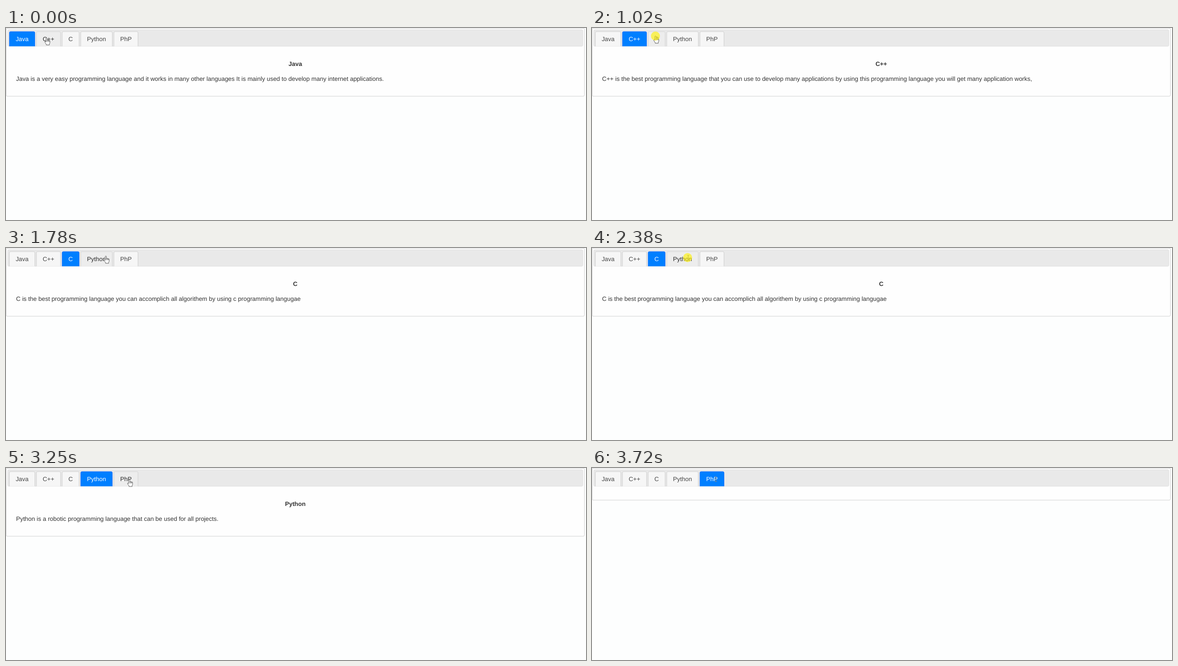
Write an HTML page that moves like this. It is 1280 px wide and 425 px high and loops after 4.07 s.

```html
<!DOCTYPE html>
<html lang="en">
<head>
<meta charset="utf-8">
<title>Language tabs</title>
<style>
html, body { margin: 0; width: 100%; height: 100%; overflow: hidden; background: #fdfefe; }
svg { display: block; font: 15.97px "Liberation Sans", Arial, sans-serif; text-rendering: geometricPrecision; }
.panel { fill: #fefefe; stroke: #c5c5c5; }
.nav { fill: #e9e9e9; stroke: #ddd; }
.tab path { fill: #f6f6f6; stroke: #c5c5c5; }
.tab text { fill: #454545; text-anchor: middle; }
.hover path { fill: #ededed; stroke: #ccc; }
.hover text { fill: #2b2b2b; }
.active path { fill: #007fff; stroke: #0062ff; }
.active text { fill: #fff; }
.body { fill: #333; }
.title { font-weight: bold; text-anchor: middle; }
.ring { fill: #fff200; opacity: .62; }
.beam { fill: none; stroke: #fff; mix-blend-mode: difference; opacity: .6; }
.hand { fill: #fff; stroke: #3a3a3a; stroke-width: .85; }
</style>
</head>
<body>
<svg id="stage" width="1280" height="425"></svg>
<script>
const LOOP = 4070, STEP = 65, SCALE = 0.8412;

const pages = {
  "Java": "Java is a very easy programming language and it works in many other languages It is mainly used to develop many internet applications.",
  "C++": "C++ is the best programming language that you can use to develop many applications by using this programming language you will get many application works,",
  "C": "C is the best programming language you can accomplich all algorithem by using c programming langugae",
  "Python": "Python is a robotic programming language that can be used for all projects.",
  "PhP": ""
};

// Each glide: start time, end time, pointer x, pointer y at the end.
const home = [89.5, 21.5];
const glides = [
  [550, 820, 140, 17.7], [1490, 1630, 222, 17.2], [1780, 1980, 211, 21.3],
  [2520, 2720, 291, 21], [3120, 3190, 257, 24], [3250, 3250, 272, 25]
];

// Each click: button down, text cursor appears, tab opens.
const clicks = [[70, 270, 270], [1020, 1290, 1290], [2180, 2380, 2450], [3450, 3650, 3720]];

const HAND = "M-1.3 9.5V1.2Q-1.3 0 0 0T1.3 1.2V6Q1.4 4.9 2.5 4.9T3.6 6.4Q3.6 5.3 4.6 5.3T5.6 7Q5.6 6 6.5 6" +
  "T7.4 7.4V10.5Q7.4 12.4 6.3 13.6V16H-.6V14.4L-3.7 10Q-4.2 8.6-3.2 8.2T-1.3 9.5ZM1.3 6v3M3.6 6.4V9M5.6 7v2";
const BEAM = "M-.7-5.2Q1.3-5.2 1.3-4.2Q1.3-5.2 3.3-5.2M1.3-4.2V4.2M-.7 5.2Q1.3 5.2 1.3 4.2Q1.3 5.2 3.3 5.2";

// Tabs take their width from the label plus padding.
const ruler = document.createElement("canvas").getContext("2d");
ruler.font = '160px "Liberation Sans", Arial, sans-serif';
let edge = 8.4;
const tabs = Object.entries(pages).map(([label, info]) => {
  const w = ruler.measureText(label).width / 10 + 34, x = edge;
  edge += w + 3.2;
  return { label, info, x, w };
});

function drawTab({ label, x, w }, state) {
  return `<g class="tab ${state}">
    <path d="M${x + .5} 48V12.5q0-3 3-3h${w - 7}q3 0 3 3V48"/>
    <text x="${x + w / 2}" y="34">${label}</text></g>`;
}

function drawPage(active, hover) {
  const { label, info } = tabs[active];
  const body = info && `<g class="body"><text class="title" x="759" y="99.8">${label}</text>
    <text x="26.4" y="138.9">${info}</text></g>`;
  return `<g transform="scale(${SCALE})">
    <rect class="panel" x=".5" y=".5" width="1517" height="${info ? 179 : 84}" rx="3"/>
    <rect class="nav" x="4.5" y="4.5" width="1509" height="43.5" rx="3"/>
    ${tabs.map((tab, i) => drawTab(tab, i === active ? "active" : i === hover ? "hover" : "")).join("")}
    ${body}</g>`;
}

// The pointer eases along each glide in even steps.
function pointer(t) {
  let [x, y] = home;
  for (const [from, to, gx, gy] of glides) {
    if (t < from) break;
    const count = Math.round((to - from) / STEP) + 1;
    const p = Math.min(1, (Math.floor((t - from) / STEP) + 1) / count);
    const ease = p * p * (3 - 2 * p);
    x += (gx - x) * ease;
    y += (gy - y) * ease;
  }
  return [x, y];
}

function draw(t) {
  const [x, y] = pointer(t);
  const active = clicks.filter(([, , open]) => open <= t).length;
  const hover = tabs.findIndex(tab => x / SCALE >= tab.x && x / SCALE <= tab.x + tab.w);
  const pressed = clicks.some(([down, , open]) => t >= down && t < open);
  const beam = hover === active || clicks.some(([, text, open]) => t >= text && t < open);
  return drawPage(active, hover) +
    `<path class="${beam ? "beam" : "hand"}" transform="translate(${x} ${y})" d="${beam ? BEAM : HAND}"/>` +
    (pressed ? `<circle class="ring" cx="${x}" cy="${y}" r="10"/>` : "");
}

const stage = document.getElementById("stage");
let shown = "", start;
function tick(now) {
  start ??= now;
  const next = draw((now - start) % LOOP);
  if (next !== shown) stage.innerHTML = shown = next;
  requestAnimationFrame(tick);
}
requestAnimationFrame(tick);
</script>
</body>
</html>
```
